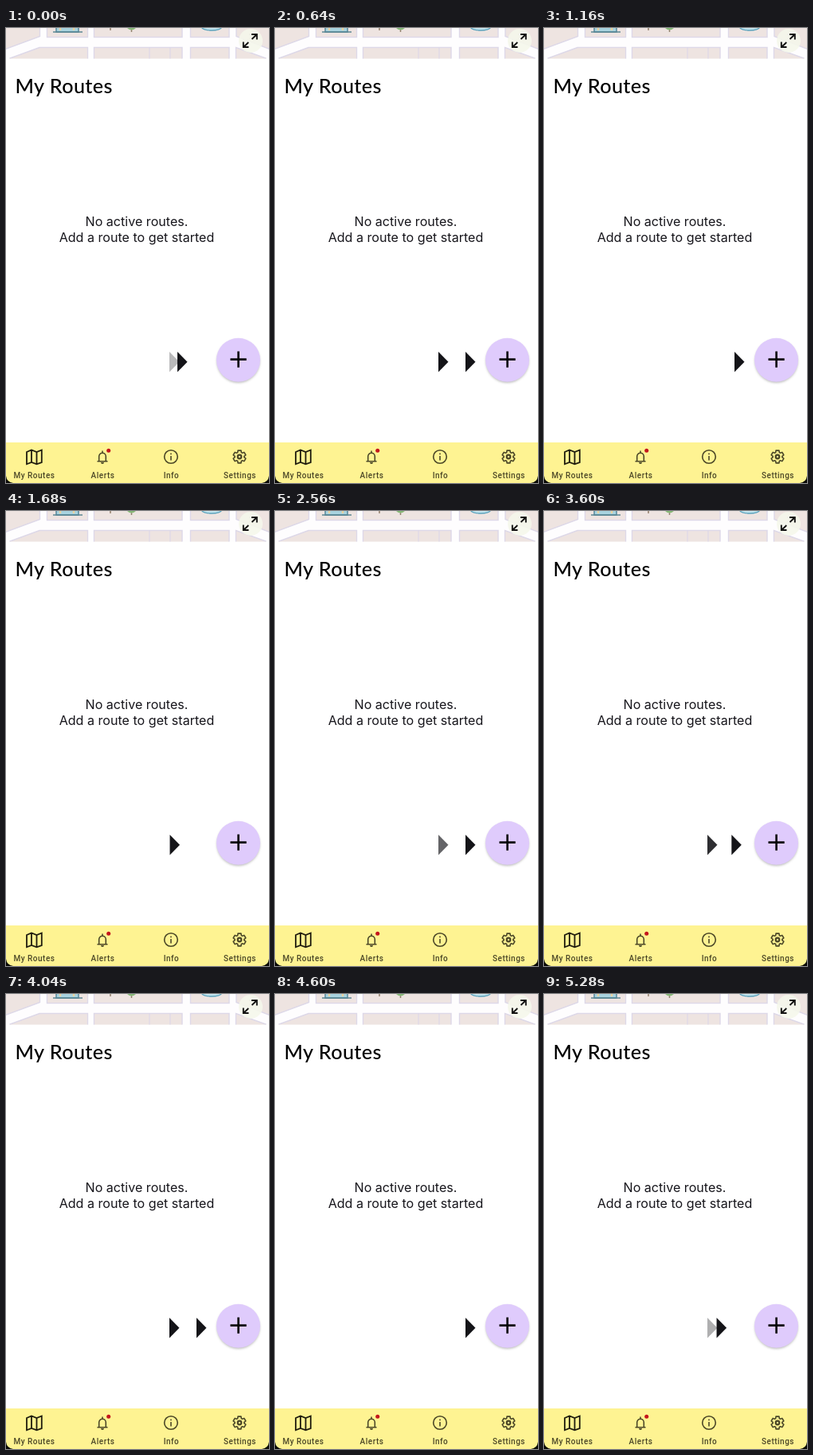
These frames come from a looping animation (330x572 px, 5320 ms). An HTML page:

```html
<!DOCTYPE html>
<html lang="en">
<head>
<meta charset="utf-8">
<title>My Routes</title>
<style>
  html, body { margin: 0; width: 100%; height: 100%; overflow: hidden; background: #fff; }
  svg { display: block; width: 330px; height: 572px; }
  .title { font: 500 25.2px Lato, sans-serif; letter-spacing: .4px; fill: #000; }
  .note { font: 400 16.1px Inter, sans-serif; fill: #17161c; text-anchor: middle; }
  .label { font: 500 10px Roboto, sans-serif; letter-spacing: .5px; fill: #4b4727; text-anchor: middle; }
  .line { fill: none; stroke: #4b4727; stroke-width: 1.6; }
  .block { fill: #eee4e1; stroke: #ddd8e8; stroke-width: 1.4; }
</style>
</head>
<body>
<svg viewBox="0 0 330 572">
  <defs>
    <filter id="soft" x="-30%" y="-30%" width="160%" height="160%"><feGaussianBlur stdDeviation="1.5"/></filter>
    <clipPath id="mapArea"><rect width="330" height="38.5"/></clipPath>
  </defs>
  <rect width="330" height="572" fill="#fff"/>

  <g clip-path="url(#mapArea)">
    <rect width="330" height="39" fill="#fefdfe"/>
    <g class="block">
      <path d="M-2 -2H42.500V10.500L-2 27Z"/>
      <path d="M5 41V38L42 24.500H102.500V41Z"/>
      <path d="M51.500 -2H102.500V11.500H51.500Z"/>
      <path d="M110.500 -2H221V11.500H110.500Z"/>
      <path d="M110.500 24.500H221V41H110.500Z"/>
      <path d="M231.500 -2H280V11.500H231.500Z"/>
      <path d="M231.500 24.500H280V41H231.500Z"/>
      <path d="M289 -2H332V27L289 10.500Z"/>
      <path d="M288.500 41V24.500L326 38V41Z"/>
      <path d="M180 24.500V41M206 24.500V41" opacity=".8"/>
    </g>
    <path d="M63 -1H91V5H63Z" fill="#a9d3df" stroke="#4f8296" stroke-width="1.4"/>
    <path d="M68 0V3M85 0V3" stroke="#e9d3a0" stroke-width="2.500"/>
    <path d="M59 5H96" stroke="#5b8794" stroke-width="1.6"/>
    <path d="M131 0V3M157.500 0V5" stroke="#93806d" stroke-width="1.5"/>
    <path d="M152 0Q157.500 5 163 0Z" fill="#88b978"/>
    <ellipse cx="258" cy="-1" rx="12.500" ry="4" fill="#c3e4ee" stroke="#5ba3bd" stroke-width="1.3"/>
    <circle cx="307" cy="16" r="15" fill="#f5f8ec" opacity=".9"/>
    <path d="M298 24L304.300 18M308.500 14L314.500 8.300M308 8H314.800V14.500M297.800 17.500V24H304.500" fill="none" stroke="#111" stroke-width="1.9"/>
  </g>

  <text class="title" x="11.500" y="81.800">My Routes</text>
  <text class="note" x="164" y="249">No active routes.</text>
  <text class="note" x="164" y="269">Add a route to get started</text>

  <path id="still" d="M0 407L12.500 419.700L0 432.500Z" fill="#141418"/>
  <path id="mover" d="M0 407L12.500 419.700L0 432.500Z" fill="#141418"/>

  <circle cx="291.500" cy="419" r="27" fill="#777" opacity=".5" filter="url(#soft)"/>
  <circle cx="291.500" cy="417.300" r="27.500" fill="#dfcbfc"/>
  <path d="M281.500 416.600H301.700M291.600 406.400V426.800" stroke="#050505" stroke-width="2.600"/>

  <rect y="521" width="330" height="51" fill="#fef392"/>
  <path d="M26 533L32 530.500L38.500 533L44.800 530.500V546L38.500 548.300L32 546L26 548.300ZM32 530.500V546M38.500 533V548.300" class="line" style="stroke:#1f1c0e;stroke-width:1.8"/>
  <path d="M114.500 544.700H127.500M116.700 544.700V538.500A4.300 4.300 0 0 1 125.300 538.500V544.700M121 534V531.500" class="line"/>
  <path d="M119 546H123A2 2 0 0 1 119 546Z" fill="#4b4727"/>
  <circle cx="128.700" cy="531.300" r="2.500" fill="#c4161c"/>
  <circle cx="207" cy="539" r="8.300" class="line"/>
  <path d="M207 538V543.500M207 534.500V536.300" class="line"/>
  <path id="gear" class="line" stroke-linejoin="round"/>
  <circle cx="293" cy="539" r="2.300" class="line" style="stroke-width:2.2"/>
  <g id="labels"></g>

  <path d="M0 563Q1 571 9 572H0ZM330 563Q329 571 321 572H330Z" fill="#0b0b08"/>
</svg>
<script>
const LOOP = 5320, CYCLE = 1758, LEAD = 126, STEP = 40, FADE = 300;
const HOME = 205, TRAVEL = 34;
const $ = id => document.getElementById(id);

$('labels').innerHTML = ['My Routes', 'Alerts', 'Info', 'Settings']
  .map((s, i) => `<text class="label" x="${35.5 + 86 * i}" y="566">${s}</text>`).join('');

const polar = (r, deg) => {
  const a = deg * Math.PI / 180;
  return `${(293 + r * Math.cos(a)).toFixed(2)} ${(539 + r * Math.sin(a)).toFixed(2)}`;
};
const teeth = [];
for (let a = -90; a < 270; a += 60)
  teeth.push(polar(5.9, a - 23), polar(8.1, a - 14), polar(8.1, a + 14), polar(5.9, a + 23));
$('gear').setAttribute('d', 'M' + teeth.join('L') + 'Z');

function ease(t, start) {
  const u = Math.min(1, Math.max(0, (t - start) / FADE));
  return u < .5 ? 4 * u ** 3 : 1 - 4 * (1 - u) ** 3;
}

function place(el, x, alpha) {
  el.setAttribute('transform', `translate(${x.toFixed(2)} 0)`);
  el.setAttribute('opacity', alpha.toFixed(3));
}

// One arrow splits off to the right, the left one fades, then they swap back.
function draw(ms) {
  const t = (Math.floor(ms % LOOP / STEP) * STEP + LEAD) % CYCLE;
  const split = ease(t, 0), fade = ease(t, 796), swap = ease(t, 1344);
  place($('still'), HOME, split - fade + swap);
  place($('mover'), HOME + TRAVEL * split, 1 - swap);
}

let begin;
function tick(now) {
  begin ??= now;
  draw(now - begin);
  requestAnimationFrame(tick);
}
draw(0);
requestAnimationFrame(tick);
</script>
</body>
</html>
```
